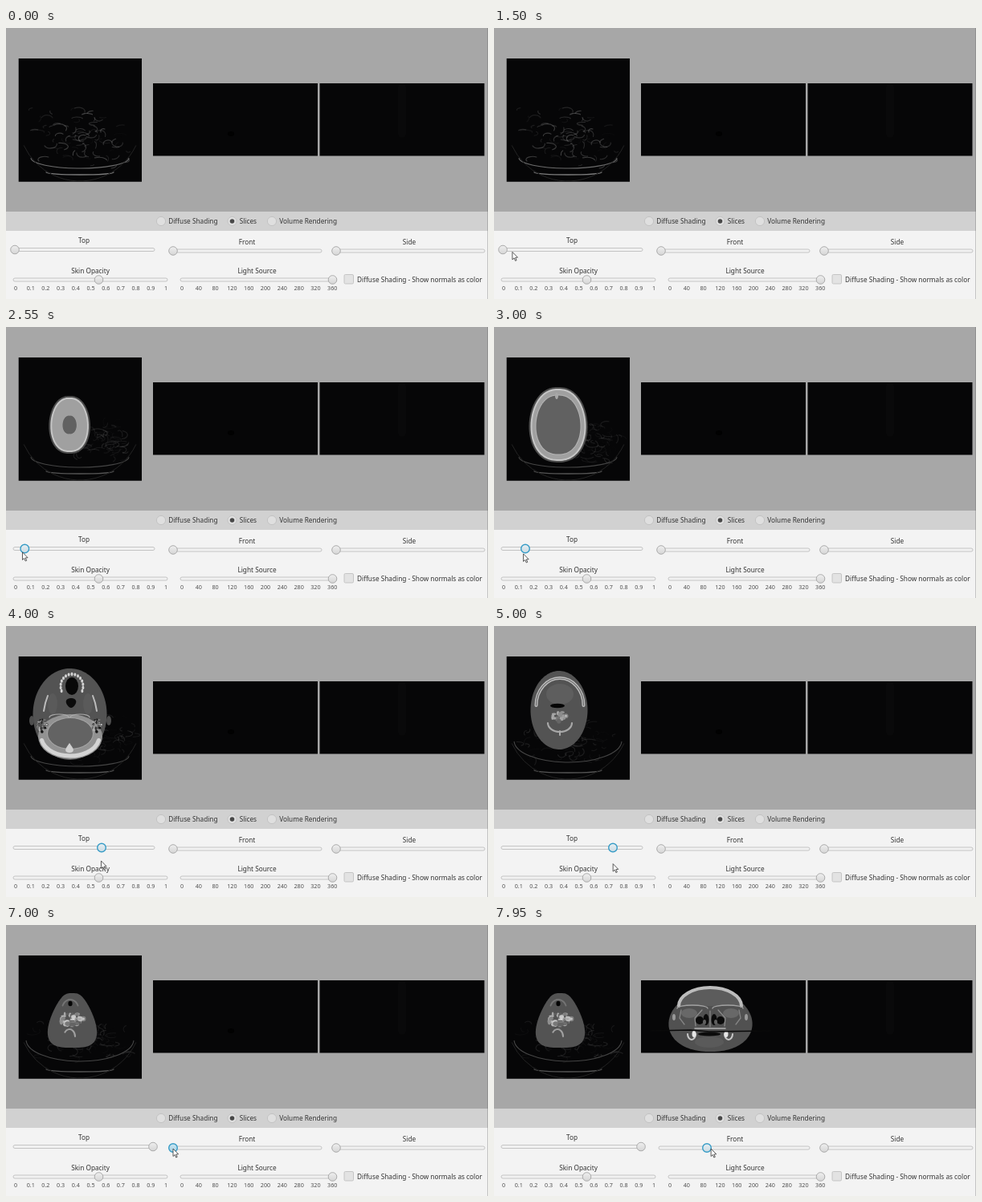
An HTML page with a canvas that plays this animation: 600x338 px, repeating every 8000 ms.

```html
<!DOCTYPE html>
<html lang="en">
<head>
<meta charset="utf-8">
<style>
html, body { margin: 0; width: 100%; height: 100%; overflow: hidden; background: #a7a7a7; }
canvas { display: block; }
</style>
</head>
<body>
<canvas id="stage" width="600" height="338"></canvas>
<script>
const c = document.getElementById('stage').getContext('2d');
const LOOP = 8000, STEP = 50, PI = Math.PI;

// Slider drags: start, end, distance
const TOP_DRAGS = [[1600, 1800, 2.3], [1900, 2000, 1.5], [2250, 3000, 24.2], [3950, 4000, 80],
  [4000, 4100, 2], [4350, 4650, 27], [5350, 5600, 35]];
const FRONT_DRAGS = [[7350, 7550, 27], [7800, 7950, 30]];

// Head cross-sections; taper widens the lower end, round < 1 squares the sides
const FACE = { x: 79.5, y: 110, rx: 46, ry: 57, taper: 0, round: 1 };
const JAW = { x: 81, y: 105, rx: 35.5, ry: 49, taper: 0, round: 1 };
const NECK = { x: 82.5, y: 119, rx: 28, ry: 34, taper: 0.38, round: 0.6 };

const mix = (a, b, k) => a + (b - a) * k;
const ramp = (t, a, b) => Math.max(0, Math.min(1, (t - a) / (b - a)));
const ease = k => k * k * (3 - 2 * k);
const dragged = (x, drags, t) => drags.reduce((sum, [a, b, d]) => sum + d * ease(ramp(t, a, b)), x);
const gray = v => `rgb(${v},${v},${v})`;

function random(seed) {
  return () => (seed = seed * 16807 % 2147483647) / 2147483647;
}

function stroke(color, width = 1) {
  c.strokeStyle = color;
  c.lineWidth = width;
  c.stroke();
}

function fill(color) {
  c.fillStyle = color;
  c.fill();
}

function oval(x, y, rx, ry, color) {
  c.beginPath();
  c.ellipse(x, y, rx, ry, 0, 0, 2 * PI);
  fill(color);
}

function arc(x, y, rx, ry, from, to, color, width) {
  c.beginPath();
  c.ellipse(x, y, rx, ry, 0, from, to);
  stroke(color, width);
}

function line(color, width, ...points) {
  c.beginPath();
  points.forEach(p => c.lineTo(...p));
  stroke(color, width);
}

function egg({ x, y, rx, ry, taper = 0, round = 1 }, color) {
  c.beginPath();
  for (let a = 0; a < 2 * PI; a += 0.05) {
    const side = Math.sign(Math.cos(a)) * Math.abs(Math.cos(a)) ** round;
    c.lineTo(x + rx * side * (1 + taper * Math.sin(a)), y + ry * Math.sin(a));
  }
  c.closePath();
  fill(color);
}

// Draws a detail on both sides of a middle line
const mirror = (mid, draw) => [-1, 1].forEach(side => draw(d => mid + side * d));

// Irregular cluster of small ovals between two gray levels
function speckle(x, y, rx, ry, count, size, dark, light) {
  const r = random(41);
  for (let i = 0; i < count; i++) {
    const a = r() * 2 * PI, d = Math.sqrt(r());
    oval(x + rx * d * Math.cos(a), y + ry * d * Math.sin(a), size * (0.5 + r()), size * (0.5 + r()), gray(mix(dark, light, r())));
  }
}

function panel(x, y, w, h, draw) {
  c.save();
  c.beginPath();
  c.rect(x, y, w, h);
  fill('#060607');
  c.clip();
  c.filter = 'blur(0.6px)';
  c.lineCap = 'round';
  draw();
  c.restore();
}

function wisps(x, y, rx, ry, strength, seed) {
  const r = random(seed), spread = () => r() + r() - 1;
  for (let i = 0; i < 90; i++) {
    const start = r() * 2 * PI;
    arc(x + rx * spread(), y + ry * spread(), 3 + 7 * r(), 2 + 4 * r(), start, start + 1 + 2 * r(),
      `rgba(160,160,160,${strength * r()})`, 1.2);
  }
}

function bed(top) {
  const empty = top < 12, deep = ramp(top, 121, 148);
  if (empty) wisps(92, 136, 65, 40, 0.36, 7);
  else wisps(mix(118, 92, deep), 142, mix(42, 66, deep), 28, 0.17, 7 + Math.round(top));
  arc(92, mix(162, 143, deep), mix(61, 67, deep), mix(13, 27, deep), 0.05, PI - 0.05, empty ? '#6c6c6c' : '#454545', 1.1);
  arc(92, 180, 42, 3, 0, PI, empty ? '#7d7d7d' : '#555', 1.3);
  arc(92, 114, 77, 77, 0.14 * PI, 0.86 * PI, '#242424');
}

function crown(top) {
  const begin = Math.sqrt(ramp(top, 11, 16)), grow = Math.sqrt(ramp(top, 16, 39));
  if (top < 16.5) {
    oval(78, 122, 12.5 * begin, 22 * begin, '#707070');
    oval(78, 122, 9 * begin, 17 * begin, '#8a8a8a');
    return;
  }
  const layer = (rx, ry, color) => egg({ x: mix(78, 80, grow), y: 122, rx, ry, taper: 0.04, round: 0.85 }, color);
  const rx = mix(12, 36.5, grow), ry = mix(22, 47, grow), inner = grow * grow;
  layer(rx, ry, '#4c4c4c');
  layer(rx - 2, ry - 2, '#c6c6c6');
  layer(rx - 4, ry - 4, '#a0a0a0');
  layer(28.5 * inner, 37.5 * inner, '#b4b4b4');
  layer(27.5 * inner, 36.5 * inner, '#616161');
  if (grow > 0.9) egg({ x: 78, y: 86, rx: 2, ry: 4 }, '#a8a8a8');
}

function faceDetails() {
  mirror(80, x => {
    oval(x(48), 118, 3, 6, '#4e4e4e');
    oval(x(22), 97, 6, 13, '#5a5a5a');
    line('#bbb', 2, [x(28), 87], [x(31), 96], [x(33), 106]);
  });
  oval(82, 75, 8, 11, '#080808');
  for (let i = 0; i <= 14; i++) {
    const a = PI * mix(0.87, 2.13, i / 14);
    oval(82 + 14 * Math.cos(a), 75 + 15 * Math.sin(a), 1.5, 2.2, '#d2d2d2');
  }
  egg({ x: 81, y: 96, rx: 6, ry: 6, taper: -0.3 }, '#0b0b0b');
  oval(80, 138, 40, 28, '#929292');
  arc(80, 138, 36, 24, 0.06 * PI, 0.94 * PI, '#d4d4d4', 5);
  oval(80, 134, 29, 20, '#a5a5a5');
  oval(80, 134, 28, 19, '#636363');
  egg({ x: 79, y: 152, rx: 4, ry: 6, taper: 0.8 }, '#d0d0d0');
  mirror(79, x => {
    speckle(x(34), 124, 6, 8, 30, 1.5, 15, 225);
    arc(x(13), 114, 12, 4, PI, 2 * PI, '#aaa', 1.2);
  });
}

function jawDetails() {
  oval(82, 85, 17, 13, '#5e5e5e');
  arc(82, 99, 29.5, 34, PI, 2 * PI, '#bdbdbd', 4);
  arc(82, 99, 29.5, 34, PI, 2 * PI, '#6a6a6a', 1.2);
  oval(79, 99.5, 9, 2.8, '#050505');
  speckle(81, 113, 9, 6, 18, 2.2, 100, 190);
  arc(82, 121, 15, 11, 0, PI, '#a8a8a8', 2.2);
  line('#aaa', 2, [82, 131], [82, 136]);
}

function neckDetails() {
  arc(80, 104, 10, 11, PI * 1.1, PI * 1.9, '#757575', 1.8);
  oval(80, 98, 2.6, 3.2, '#050505');
  speckle(82, 118, 15, 8, 45, 2.4, 90, 210);
  oval(83, 124, 4, 2.5, '#646464');
  arc(79, 139, 7, 9, PI * 1.2, PI * 2, '#a0a0a0', 2);
}

function head(top) {
  const toJaw = ramp(top, 121, 148), toNeck = ramp(top, 148, 183);
  const outline = {};
  for (const key in FACE) outline[key] = mix(mix(FACE[key], JAW[key], toJaw), NECK[key], toNeck);
  egg(outline, '#535353');
  const layers = [[1 - toJaw, faceDetails], [toJaw * (1 - toNeck), jawDetails], [toNeck, neckDetails]];
  for (const [alpha, details] of layers) {
    c.globalAlpha = alpha;
    if (alpha) details();
  }
  c.globalAlpha = 1;
}

function streak() {
  line('#0a0a0a', 1.5, [195, 132], [245, 131], [268, 133], [345, 132]);
}

function noseSlice(k) {
  const s = Math.sqrt(k);
  oval(268, 128, 38 * s, 33 * s, '#484848');
  mirror(268, x => oval(x(7 * s), 120, 4 * s, 8 * s, '#080808'));
  streak();
  for (let i = -3; i <= 3; i++) oval(268 + i * 6 * s, 137, 2.2 * s, 5 * s, '#d0d0d0');
}

function frontHead() {
  egg({ x: 269.5, y: 121, rx: 52, ry: 37, taper: 0.06, round: 0.9 }, '#515151');
  c.beginPath();
  c.ellipse(269, 101, 39, 23, 0, PI, 2 * PI);
  fill('#5c5c5c');
  stroke('#bcbcbc', 4);
  mirror(269, x => {
    oval(x(26), 110, 10, 6, '#686868');
    arc(x(22), 104, 19, 4, PI, 2 * PI, '#a2a2a2', 1.3);
    oval(x(5), 118, 3.5, 7, '#0b0b0b');
    oval(x(13), 119, 5, 5, '#0b0b0b');
    oval(x(7), 121, 2, 3, '#606060');
    line('#8c8c8c', 1.2, [x(10), 106], [x(19), 116], [x(18), 126]);
    line('#848484', 1.3, [x(36), 106], [x(38), 116], [x(32), 124]);
    oval(x(45), 115, 2, 4, '#999');
    arc(x(23), 136, 5, 7, 0, PI, '#c8c8c8', 2);
    oval(x(20), 136, 2.5, 4, '#e6e6e6');
  });
  line('#8c8c8c', 1.2, [269, 107], [269, 127]);
  line('#b0b0b0', 1.5, [250, 129], [288, 129]);
  streak();
  oval(268, 136, 14, 2.5, '#0b0b0b');
  oval(268, 146, 18, 7, '#5a5a5a');
}

function text(s, x, y, align = 'left', size = 8.26, color = '#333') {
  c.font = `${size}px "Noto Sans", sans-serif`;
  c.textAlign = align;
  c.fillStyle = color;
  c.fillText(s, x, y);
}

function knob(x, y, focus, hover) {
  const g = c.createLinearGradient(0, y - 5, 0, y + 5);
  g.addColorStop(0, hover ? '#cde7f2' : focus ? '#e6eef2' : '#eee');
  g.addColorStop(1, hover ? '#a3cfe2' : focus ? '#cbdbe3' : '#d6d6d6');
  oval(x, y, 5.3, 5.3, g);
  stroke(focus ? '#359bc6' : '#a4a4a4', focus ? 1.4 : 0.9);
}

function slider(x1, x2, y, x, focus, hover) {
  c.beginPath();
  c.roundRect(x1, y - 2, x2 - x1, 4, 2);
  fill('#f1f1f1');
  stroke('#b9b9b9', 0.8);
  knob(x, y, focus, hover);
}

function radio(label, x, selected) {
  oval(x, 241, 5.6, 5.6, '#dfdfdf');
  stroke('#bebebe', 0.8);
  if (selected) oval(x, 241, 2.8, 2.8, '#484848');
  text(label, x + 9.2, 244);
}

function controls(t, top, front) {
  c.fillStyle = '#d1d1d1';
  c.fillRect(0, 229, 600, 24);
  c.fillStyle = '#f3f3f3';
  c.fillRect(0, 253, 600, 85);
  radio('Diffuse Shading', 193);
  radio('Slices', 281.5, true);
  radio('Volume Rendering', 331);
  text('Top', 97, 268, 'center');
  text('Front', 300, 270, 'center');
  text('Side', 502, 270, 'center');
  text('Skin Opacity', 105, 305.5, 'center');
  text('Light Source', 312.5, 305.5, 'center');
  const onFront = t >= 6950;
  slider(9, 185, 276.5, top, t >= 1600 && !onFront, t >= 1600 && t < 2400);
  slider(205, 393, 278, front, onFront, onFront && t < 7550);
  slider(407, 596, 278, 411);
  slider(9, 201, 314, 115.5);
  slider(217, 411, 314, 406.5);
  for (let i = 0; i <= 10; i++) text(String(i / 10), 12 + i * 18.7, 326.8, 'center', 7.2, '#505050');
  for (let i = 0; i <= 9; i++) text(String(i * 40), 219 + i * 20.8, 326.8, 'center', 7.2, '#505050');
  c.beginPath();
  c.roundRect(421, 307.5, 11.5, 11.5, 1.5);
  fill('#e3e3e3');
  stroke('#bcbcbc', 0.8);
  text('Diffuse Shading - Show normals as color', 437, 316.5);
}

// The pointer drifts down along the top slider, then crosses to the front one
function cursor(t, top, front) {
  const along = (top - 16) / 167, cross = ease(ramp(t, 6700, 7000));
  const enter = 30 * (1 - ramp(t, 1400, 1600));
  const x = mix(top - 3 + 4 * along + enter, front + (front - 208) * 0.09, cross);
  const y = mix(280 + 21 * along, 279, cross);
  c.beginPath();
  [[0, 0], [0, 9.5], [2.2, 7.5], [3.7, 11], [5.2, 10.3], [3.7, 7], [6.6, 6.8]].forEach(p => c.lineTo(x + p[0], y + p[1]));
  c.closePath();
  fill('#fff');
  stroke('#333', 0.8);
}

function draw(t) {
  const top = dragged(11, TOP_DRAGS, t), front = dragged(208, FRONT_DRAGS, t);
  c.fillStyle = '#a7a7a7';
  c.fillRect(0, 0, 600, 229);
  panel(15.7, 38, 153.3, 153.8, () => {
    bed(top);
    if (top < 39.5) crown(top);
    else head(top);
  });
  panel(183, 69, 205, 90.6, () => {
    if (front > 236) frontHead();
    else if (front > 208) noseSlice(ramp(front, 208, 235));
    else oval(280, 132, 4, 3, '#010101');
  });
  panel(390.5, 69, 205, 90.6, () => line('#09090a', 10, [493, 74], [493, 132]));
  controls(t, top, front);
  c.fillStyle = 'rgba(90,90,90,.3)';
  c.fillRect(599, 0, 1, 338);
  if (t >= 1450) cursor(t, top, front);
}

function tick() {
  draw(Math.floor(performance.now() % LOOP / STEP) * STEP);
  requestAnimationFrame(tick);
}
tick();
</script>
</body>
</html>
```
